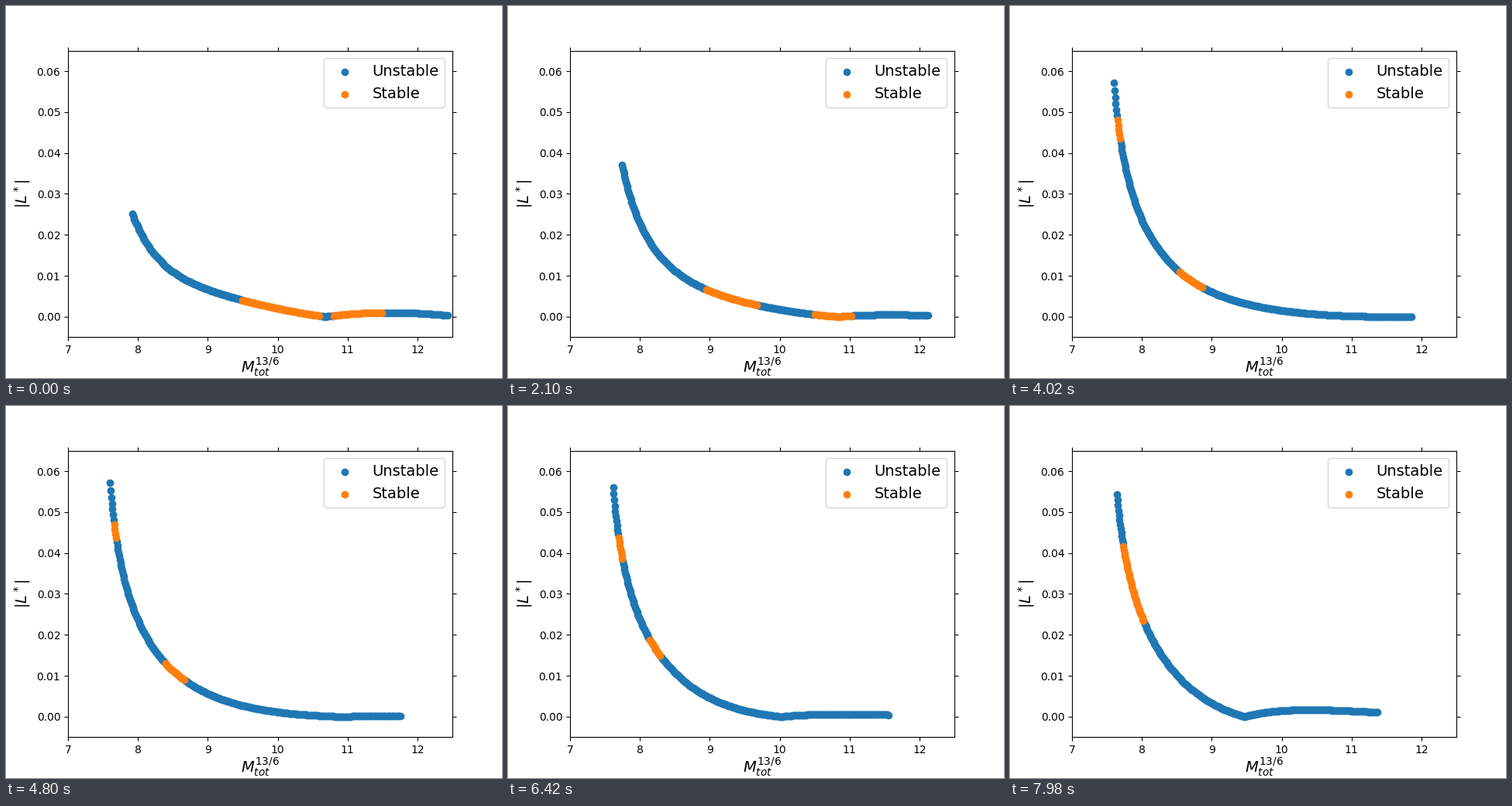
Recreate the animation shown at these times as a matplotlib script. Size 640x480 px, loop 8 s.

```python
import numpy as np
import matplotlib.pyplot as plt
from matplotlib.animation import FuncAnimation

LOOP, INTERVAL, STEP = 8000, 40, 60
POINTS = 300
TURN = 67  # step at which the steep end stops rising


def curve_ends(before, after, k):
    lo = 7.6 + 0.00426 * before + 7.8e-6 * before**2 + 1e-5 * after**2
    hi = 12.435 - 0.0091 * k + 8.2e-6 * k**2
    return lo, hi


def height(x, before, after):
    """Absolute value of a falling curve plus one slow swell per half."""
    w = 2 - np.sqrt(x - 7.55 + 0.0003 * before - 0.7e-5 * after**2)
    fall = 73 * w**2 + 34.3 * w**4
    wave = 0.15 * before * np.cos(4.7 * (w - 0.64))
    dip = (0.28 * after + 0.0035 * after**2) * np.exp(-((w - 0.62) / 0.53) ** 2)
    return np.abs(fall + wave - dip) * 1e-4


def stable_bands(lo, after, k):
    mid = 9.49 - 0.0172 * k + 4.3e-5 * k**2
    width = np.interp(k, [0, 15, 35, 67, 100, 133],
                      [1.11, 0.82, 0.73, 0.34, 0.17, 0.06])
    yield mid, mid + width
    yield 10.8 - 0.0133 * k + 1.33e-4 * k**2, 11.49 - 0.008 * k - 1.4e-4 * k**2
    yield lo + 0.045 + 0.0007 * after, 7.69 + 1e-6 * after**3


def state(k):
    before, after = max(TURN - k, 0), max(k - TURN, 0)
    lo, hi = curve_ends(before, after, k)
    s = np.linspace(0, 1, POINTS)
    x = lo + (hi - lo) * (0.6 * s + 0.4 * s**2)
    stable = np.zeros(POINTS, bool)
    for a, b in stable_bands(lo, after, k):
        stable |= (x >= a) & (x <= b)
    return np.column_stack([x, height(x, before, after)]), stable


fig, ax = plt.subplots(figsize=(6.4, 4.8), dpi=100)
unstable_dots = ax.scatter([], [], color="C0", label="Unstable")
stable_dots = ax.scatter([], [], color="C1", label="Stable")
ax.set_xlim(7, 12.5)
ax.set_ylim(-0.005, 0.065)
ax.set_xticks(range(7, 13))
ax.set_yticks(np.arange(7) / 100)
ax.tick_params(top=True, right=True)
ax.set_xlabel(r"$M_{tot}^{13/6}$", fontsize=14, labelpad=1)
ax.set_ylabel(r"$|L^*|$", fontsize=14)
ax.legend(loc="upper right", fontsize=14)


def update(i):
    k = int((i + 0.5) * INTERVAL // STEP)
    pts, stable = state(k)
    unstable_dots.set_offsets(pts[~stable])
    stable_dots.set_offsets(pts[stable])
    return unstable_dots, stable_dots


anim = FuncAnimation(fig, update, frames=LOOP // INTERVAL, interval=INTERVAL,
                     repeat=True, repeat_delay=0)
plt.show()
```
